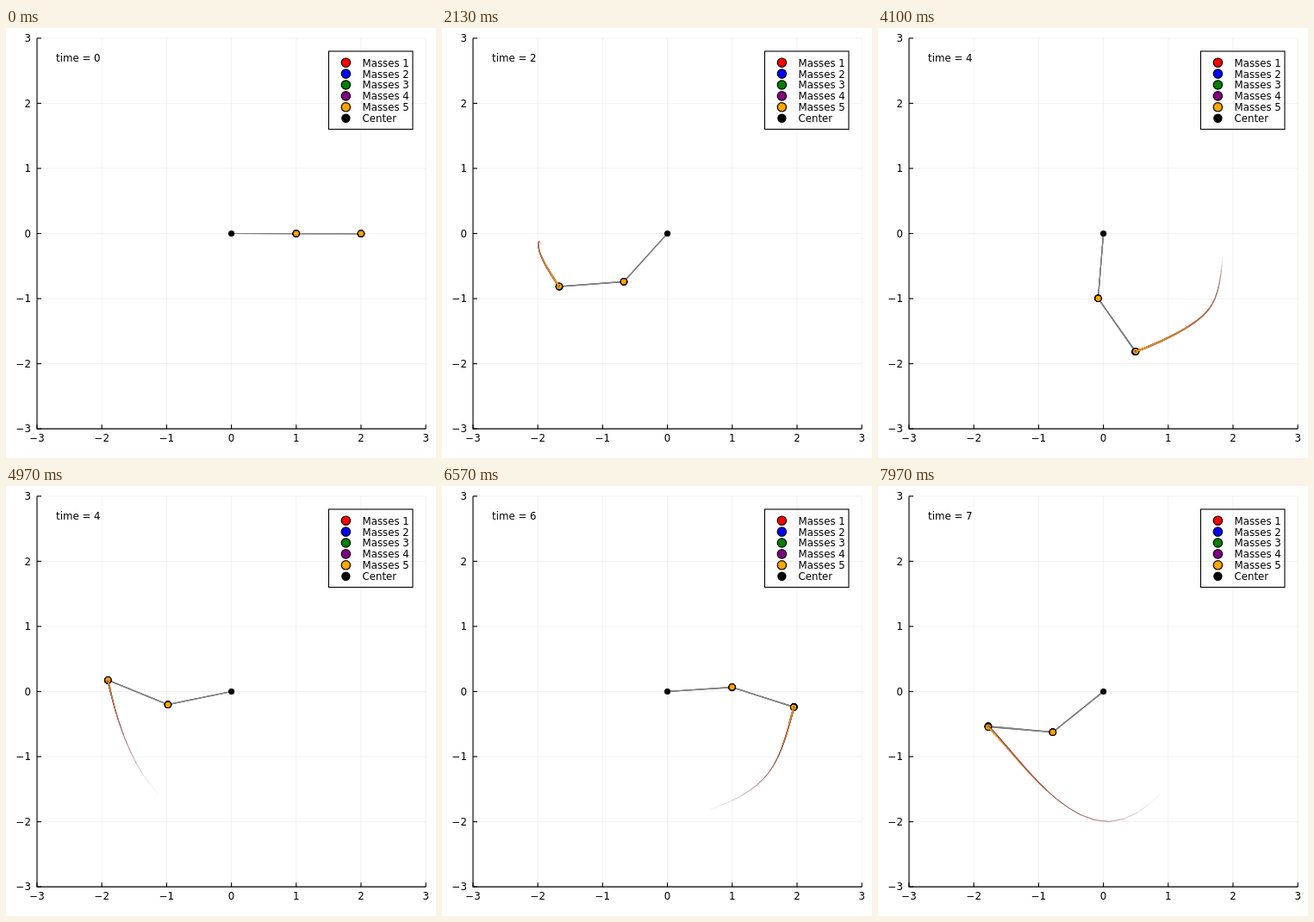
An HTML page with a canvas that plays this animation: 499x499 px, repeating every 8000 ms.

```html
<!DOCTYPE html>
<html lang="en">
<head>
<meta charset="utf-8">
<title>Double pendulums</title>
<style>
html, body { margin: 0; width: 100%; height: 100%; overflow: hidden; background: #fff; }
canvas { display: block; }
</style>
</head>
<body>
<canvas id="stage" width="499" height="499"></canvas>
<script>
const ctx = document.getElementById('stage').getContext('2d');
const COLORS = ['red', 'blue', 'green', 'purple', 'orange'];
const LOOP = 8000, FRAMES = 240, STEP = 0.03, SUBSTEPS = 20;
const GRAVITY = 9.81, SPREAD = 0.0005, TRAIL = 20, TRAIL_WIDTH = 2;

const px = x => 261.6 + 75.2 * x;
const py = y => 238.5 - 75.55 * y;

// Two unit masses on unit rods; angles are measured from straight down.
function derivative([a, b, u, v]) {
  const d = a - b, s = Math.sin(d), c = Math.cos(d), den = 3 - Math.cos(2 * d);
  return [u, v,
    (-3 * GRAVITY * Math.sin(a) - GRAVITY * Math.sin(a - 2 * b) - 2 * s * (v * v + u * u * c)) / den,
    2 * s * (2 * u * u + 2 * GRAVITY * Math.cos(a) + v * v * c) / den];
}

function rungeKutta(state, h) {
  const shift = (k, f) => state.map((value, i) => value + f * k[i]);
  const k1 = derivative(state);
  const k2 = derivative(shift(k1, h / 2));
  const k3 = derivative(shift(k2, h / 2));
  const k4 = derivative(shift(k3, h));
  return state.map((value, i) => value + h / 6 * (k1[i] + 2 * k2[i] + 2 * k3[i] + k4[i]));
}

function simulate(offset) {
  let state = [Math.PI / 2 + offset, Math.PI / 2 + offset, 0, 0];
  const poses = [];
  for (let n = 0; n < FRAMES; n++) {
    const [a, b] = state;
    const x = Math.sin(a), y = -Math.cos(a);
    poses.push([[px(x), py(y)], [px(x + Math.sin(b)), py(y - Math.cos(b))]]);
    for (let i = 0; i < SUBSTEPS; i++) state = rungeKutta(state, STEP / SUBSTEPS);
  }
  return poses;
}

const pendulums = COLORS.map((color, i) => ({ color, poses: simulate((i - 4) * SPREAD) }));

function line(points, color, width) {
  ctx.beginPath();
  points.forEach(([x, y]) => ctx.lineTo(x, y));
  ctx.strokeStyle = color;
  ctx.lineWidth = width;
  ctx.stroke();
}

function dot([x, y], radius, color) {
  ctx.beginPath();
  ctx.arc(x, y, radius, 0, 2 * Math.PI);
  ctx.fillStyle = color;
  ctx.fill();
  ctx.strokeStyle = '#000';
  ctx.lineWidth = 1.2;
  ctx.stroke();
}

function text(label, x, y, align) {
  ctx.fillStyle = '#000';
  ctx.textAlign = align;
  ctx.fillText(label, x, y);
}

function drawAxes() {
  const left = px(-3), right = px(3), top = py(3), bottom = py(-3);
  for (let i = -3; i <= 3; i++) {
    line([[px(i), top], [px(i), bottom]], 'rgba(0,0,0,.1)', 0.6);
    line([[left, py(i)], [right, py(i)]], 'rgba(0,0,0,.1)', 0.6);
  }
  line([[left, top], [left, bottom], [right, bottom]], '#000', 1.1);
  for (let i = -3; i <= 3; i++) {
    line([[px(i), bottom], [px(i), bottom - 5]], '#000', 1.1);
    line([[left, py(i)], [left + 5, py(i)]], '#000', 1.1);
    const label = String(i).replace('-', '−');
    text(label, px(i), 480, 'center');
    text(label, 29, py(i) + 4.3, 'right');
  }
}

function drawLegend() {
  ctx.strokeStyle = '#000';
  ctx.lineWidth = 1.1;
  ctx.strokeRect(374.5, 27, 97.5, 90.5);
  [...COLORS, 'black'].forEach((color, i) => {
    const y = 40.2 + 12.9 * i;
    dot([394.4, y], color === 'black' ? 4.6 : 5.2, color);
    text(i < 5 ? `Masses ${i + 1}` : 'Center', 413.5, y + 4.4, 'left');
  });
}

function drawTrail({ color, poses }, frame) {
  const first = Math.max(0, frame - TRAIL);
  for (let n = first; n < frame; n++) {
    const strength = (n - first) / (frame - first);
    ctx.globalAlpha = strength;
    line([poses[n][1], poses[n + 1][1]], color, TRAIL_WIDTH * strength);
  }
  ctx.globalAlpha = 1;
}

function roundHalfEven(x) {
  const r = Math.round(x);
  return Math.abs(x % 1 - 0.5) < 1e-9 && r % 2 ? r - 1 : r;
}

function draw(now) {
  const tick = Math.floor(now % LOOP / 10) * 10;
  const frame = Math.min(FRAMES - 1, Math.floor((tick + 5) * 0.03));
  ctx.fillStyle = '#fff';
  ctx.fillRect(0, 0, 499, 499);
  ctx.font = '11.8px "DejaVu Sans", sans-serif';
  drawAxes();
  for (const { poses } of pendulums) line([[px(0), py(0)], ...poses[frame]], 'gray', 1.1);
  for (const { color, poses } of pendulums) poses[frame].forEach(p => dot(p, 3.7, color));
  dot([px(0), py(0)], 3, 'black');
  for (const pendulum of pendulums) drawTrail(pendulum, frame);
  text(`time = ${roundHalfEven(frame * STEP)}`, 58, 39, 'left');
  drawLegend();
  requestAnimationFrame(draw);
}
requestAnimationFrame(draw);
</script>
</body>
</html>
```
